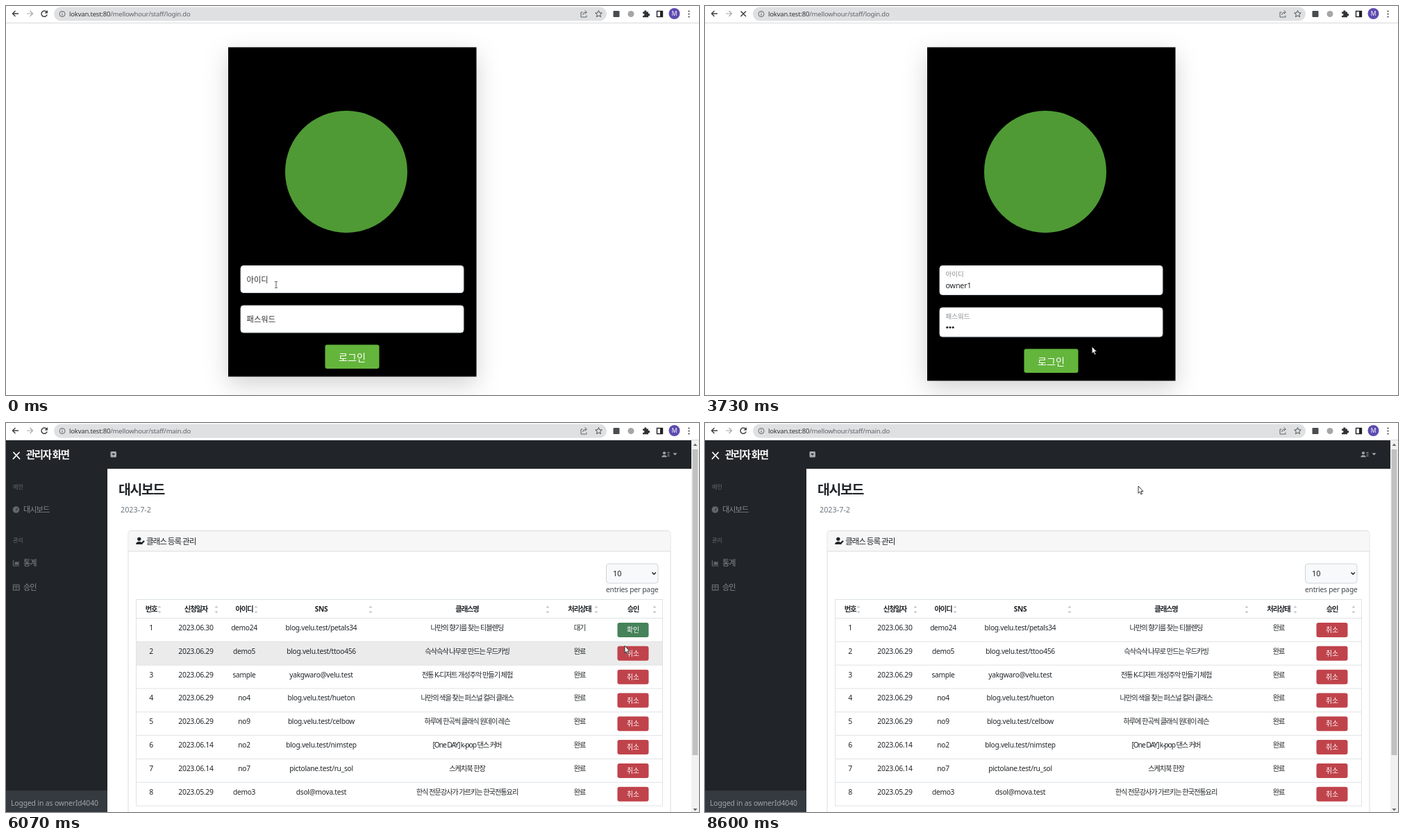
These frames come from a looping animation (998x561 px, 8.67 s). An HTML page:

```html
<!DOCTYPE html>
<html lang="ko">
<head>
<meta charset="utf-8">
<style>
html, body { margin: 0; width: 100%; height: 100%; overflow: hidden; background: #fff; }
svg { display: block; width: 998px; height: 561px; }
text { font-family: "Noto Sans", "Noto Sans CJK KR", sans-serif; white-space: pre; }
</style>
</head>
<body>
<svg id="stage" viewBox="0 0 998 561"></svg>
<script>
const NS = 'http://www.w3.org/2000/svg';
const stage = document.getElementById('stage');

function add(parent, tag, attrs = {}) {
  const el = document.createElementNS(NS, tag);
  for (const k in attrs) el.setAttribute(k, attrs[k]);
  parent.appendChild(el);
  return el;
}
const group = (p, a) => add(p, 'g', a);
const rect = (p, x, y, width, height, fill, more) => add(p, 'rect', { x, y, width, height, fill, ...more });
const circle = (p, cx, cy, r, fill, more) => add(p, 'circle', { cx, cy, r, fill, ...more });
const path = (p, d, fill, more) => add(p, 'path', { d, fill, ...more });
const line = (p, d, stroke, w = 1, more) => path(p, d, 'none', { stroke, 'stroke-width': w, ...more });
function text(p, x, y, str, size, fill, { bold, mid, gap = 0 } = {}) {
  const el = add(p, 'text', {
    x, y, fill, 'font-size': size, 'letter-spacing': gap,
    'font-weight': bold ? 700 : 400, 'text-anchor': mid ? 'middle' : 'start'
  });
  el.textContent = str;
  return el;
}
const show = (el, on) => { el.style.display = on ? '' : 'none'; };
const move = (el, x, y) => el.setAttribute('transform', `translate(${x} ${y})`);
const clamp = v => Math.max(0, Math.min(1, v));
const mix = (a, b, p) => a + (b - a) * p;

/* ---------- login page ---------- */
function buildLogin() {
  const g = group(stage);
  const card = rect(g, 320, 59.5, 357.5, 475, '#000');
  card.style.filter = 'drop-shadow(0 11px 17px rgba(0,0,0,.175))';
  circle(g, 490, 239, 88, '#4f9a35');

  function field(label) {
    const f = group(g);
    const ring = rect(f, 335.5, -2.5, 326, 45, '#0b2256', { rx: 6 });
    const box = rect(f, 338, 0.5, 321, 39, '#fff', { rx: 4 });
    const name = text(f, 0, 0, label, 11.3, '#333');
    const caret = rect(f, 0, 23, 1, 12, '#111');
    return {
      f, caret,
      set(y, p, focus) {
        move(f, 0, y);
        box.setAttribute('height', 39 + 3 * p);
        box.setAttribute('stroke', focus ? '#86a9e8' : '#ced4da');
        ring.setAttribute('height', 45 + 3 * p);
        show(ring, focus);
        show(caret, focus && p === 1);
        name.setAttribute('transform', `translate(346.5 ${mix(24.5, 16, p)}) scale(${mix(1, .84, p)})`);
        name.setAttribute('fill', p > .5 ? '#8a8d90' : '#333');
      }
    };
  }
  const id = field('아이디');
  const pw = field('패스워드');
  const value = text(id.f, 346.5, 32.5, '', 10.8, '#212529', { gap: -.2 });
  const dots = [0, 1, 2].map(i => circle(pw.f, 348.8 + i * 4.2, 29, 1.6, '#212529'));
  const button = group(g);
  const face = rect(button, 459.5, 488.5, 78, 34.5, '#64b53c', { rx: 3 });
  text(button, 498.5, 511.5, '로그인', 14.1, '#fff', { mid: 1 });

  const keys = [730, 930, 1070, 1200, 1330, 1530];
  const dotKeys = [2000, 2130, 2270];
  return t => {
    show(g, t < 5200);
    const a = clamp((t - 138) / 198), b = clamp((t - 1805) / 198);
    id.set(374, a, t >= 200 && t < 1870);
    pw.set(431.5 + 3 * a, b, t >= 1870 && t < 3330);
    value.textContent = 'owner1'.slice(0, keys.filter(k => t >= k).length);
    id.caret.setAttribute('x', 346.5 + (t < 730 ? 0 : value.getComputedTextLength()));
    const n = dotKeys.filter(k => t >= k).length;
    dots.forEach((d, i) => show(d, i < n));
    pw.caret.setAttribute('x', 347 + n * 4.2);
    const shift = 3 * (a + b);
    move(button, 0, shift);
    card.setAttribute('height', 475 + shift);
    face.setAttribute('fill', t >= 3260 && t < 3730 ? '#589f35' : '#64b53c');
  };
}

/* ---------- dashboard ---------- */
const rows = [
  ['2023.06.30', 'demo24', 'blog.velu.test/petals34', '나만의 향기를 찾는 티블렌딩'],
  ['2023.06.29', 'demo5', 'blog.velu.test/ttoo456', '슥삭슥삭 나무로 만드는 우드카빙'],
  ['2023.06.29', 'sample', 'yakgwaro@velu.test', '전통 K-디저트 개성주악 만들기 체험'],
  ['2023.06.29', 'no4', 'blog.velu.test/hueton', '나만의 색을 찾는 퍼스널 컬러 클래스'],
  ['2023.06.29', 'no9', 'blog.velu.test/celbow', '하루에 한곡씩 클래식 원데이 레슨'],
  ['2023.06.14', 'no2', 'blog.velu.test/nimstep', '[One DAY] k-pop 댄스 커버'],
  ['2023.06.14', 'no7', 'pictolane.test/ru_sol', '스케치북 한장'],
  ['2023.05.29', 'demo3', 'dsol@mova.test', '한식 전문강사가 가르키는 한국전통요리']
];
const heads = ['번호', '신청일자', '아이디', 'SNS', '클래스명', '처리상태', '승인'];
const PITCH = 33.82;

function userIcon(p, x, y, s, fill) {
  const g = group(p, { transform: `translate(${x} ${y}) scale(${s})`, fill });
  circle(g, 4, 3, 2.8, fill);
  path(g, 'M-1 11C-1 5.500 9 5.500 9 11Z', fill);
  return g;
}

// The late version has the web font, date, sorting and a scrollbar.
function buildDash(late) {
  const g = group(stage);
  const L = (a, b) => late ? b : a;
  const right = L(998, 987);
  const ink = '#212529', soft = '#86898d';
  rect(g, 0, 25, 998, 536, '#fff');
  rect(g, 0, 25, right, 41, ink);
  rect(g, 0, 66, 146, 495, ink);
  rect(g, 0, 530, 146, 31, '#343a40');

  line(g, 'M11 42.500L19.500 51.500M19 42.500L10.500 51.500', '#fff', 1.8, { 'stroke-linecap': 'round' });
  text(g, L(34, 29), L(51, 50.5), '관리자 화면', 14.4, '#fff', { bold: 1, gap: L(0, -1.4) });
  rect(g, L(151, 150.5), 41, 8.5, 8.5, '#a9abad', { rx: 1.5 });
  path(g, `M${L(153, 152.5)} 44h4.500l-2.250 2.800z`, ink);
  const ux = L(955, 945);
  userIcon(g, ux, 41, .75, '#a0a2a4');
  line(g, `M${ux + 7.5} 42.500h3M${ux + 7.5} 45h3M${ux + 7.5} 47.500h3`, '#a0a2a4');
  path(g, `M${ux + 15.5} 43.500h6l-3 3z`, '#b4b6b8');

  const nav = (y, s) => text(g, 25, y, s, 11.2, soft, { gap: L(0, -1) });
  text(g, 10, 95, '메인', 8.2, '#65696d');
  nav(129, '대시보드');
  text(g, 10, 172, '관리', 8.2, '#65696d');
  nav(206, '통계');
  nav(241, '승인');
  circle(g, 14.500, 125, 4.8, '#63676b');
  line(g, 'M14.500 126.500l2-3.500', ink);
  line(g, 'M10.500 198v8h9', '#63676b', 1.2);
  path(g, 'M12.500 204.500v-3l2-2 2 1.500 2-2v5.500z', '#63676b');
  rect(g, 10.5, 233.500, 8.5, 7.5, 'none', { stroke: '#63676b', 'stroke-width': 1.3 });
  line(g, 'M10.500 236.500h8.500M14.750 234v7', '#63676b');
  text(g, 7, 551.5, 'Logged in as ownerId4040', 10.3, '#a2a5a8', { gap: L(0, -.1) });

  text(g, 162, 103, '대시보드', 19.4, ink, { bold: 1, gap: L(0, -1.3) });
  if (late) text(g, 165, 129, '2023-7-2', 10.8, '#6c757d');

  const top = L(138, 155) + .5, edge = L(968, 957);
  rect(g, 176, top, edge - 176, L(365, 430), '#fff', { rx: 4, stroke: '#dcdcdc' });
  path(g, `M176.500 ${top + 29.5}v-26q0-3 3-3H${edge - 3.5}q3 0 3 3v26z`, '#f7f7f7');
  line(g, `M176 ${top + 29.5}H${edge}`, '#dcdcdc');
  userIcon(g, 188, top + 9, .95, ink);
  line(g, `M194.500 ${top + 19}l4.500-4.500`, ink, 2.4);
  text(g, L(203, 202), top + L(18.5, 19), '클래스 등록 관리', 11.6, ink, { gap: L(0, -1.05) });

  if (late) {
    rect(g, 864.5, 203, 74.5, 28, '#f8f9fa', { rx: 4, stroke: '#ced4da' });
    text(g, 874, 221, '10', 11, ink);
    line(g, 'M930.500 215.500l2.700 2.700 2.700-2.700', ink, 1.6);
    text(g, 864, 243.500, 'entries per page', 10.2, '#43484c', { gap: -.2 });
  }

  const cols = L([208, 270.5, 340, 454, 675, 846, 919], [209, 273.5, 343, 454, 664, 826, 903]);
  const y0 = L(208.5, 281.5), end = L(957, 946), size = L(11.3, 10.3);
  const cell = (c, y, s, more) => {
    const kr = /[가-힣]/.test(s);
    const num = /^[\d.]+$/.test(s);
    return text(g, cols[c], y, s, kr ? size : num ? 10.4 : L(10.8, 10.2), ink,
      { mid: 1, gap: kr ? L(0, -1.12) : L(num ? -.3 : -.1, -.27), ...more });
  };
  const hover = rect(g, 187, y0, end - 187, PITCH, '#ebebeb');
  heads.forEach((h, i) => cell(i, L(198, 272), h, { bold: 1 }));
  if (late) {
    line(g, 'M187 254.500H946M187.500 254V552M945.500 254V552', '#dee2e6');
    for (const x of [221, 303, 360, 525, 780, 850, 934])
      path(g, `M${x - 2.5} 266.500h5l-2.500-3zM${x - 2.5} 271.500h5l-2.500 3z`, '#c3c6c9');
  }
  for (let i = 0; i <= 8; i++) line(g, `M187 ${y0 + i * PITCH}H${end}`, '#dee2e6');

  let state, face, label;
  rows.forEach((r, i) => {
    const y = y0 + i * PITCH;
    const base = y + L(19.5, 17.5);
    [String(i + 1), ...r].forEach((s, c) => cell(c, base, s));
    const st = cell(5, base, i ? '완료' : '대기');
    const btn = rect(g, cols[6] - 22.5, y + 6.5, 45, 21, i ? '#c0434b' : '#46825a', { rx: 3 });
    const tx = text(g, cols[6], y + 20.7, i ? '취소' : '확인', 9.8, '#fff', { mid: 1 });
    if (!i) [state, face, label] = [st, btn, tx];
  });

  if (late) {
    rect(g, 987, 25, 11, 536, '#f1f1f1');
    rect(g, 988.5, 38, 8, 441, '#c1c1c1');
    path(g, 'M989.500 33h6l-3-3.500zM989.500 556h6l-3 3.500z', '#6b6b6b');
  }

  return t => {
    show(g, late ? t >= 5400 : t >= 5200 && t < 5400);
    let row = -1;
    if (late && t < 8470) row = t > 6200 ? 0 : Math.floor((cursorAt(t + 67)[1] - y0) / PITCH);
    show(hover, row >= 0 && row < 8);
    hover.setAttribute('y', y0 + Math.max(row, 0) * PITCH);
    const done = t >= 8530;
    state.textContent = done ? '완료' : '대기';
    label.textContent = done ? '취소' : '확인';
    const press = t >= 6870 && t < 7000;
    face.setAttribute('fill', done ? '#c0434b' : press ? '#315b3d' : t >= 6470 ? '#3d6d4a' : '#46825a');
  };
}

/* ---------- browser bar ---------- */
function buildBar() {
  const g = group(stage), dark = '#3c4043';
  rect(g, 0, 0, 998, 25, '#fff');
  line(g, 'M0 24.500H998', '#d8d8d8');
  line(g, 'M18 11H9.500M13.500 7L9.500 11l4 4', dark, 1.4);
  line(g, 'M30 11h8.500M34.500 7l4 4-4 4', '#a5a7a9', 1.2);
  const reload = group(g);
  line(reload, 'M58.500 8.500A4.200 4.200 0 1 0 59.200 12.500', dark, 1.5);
  path(reload, 'M60 6v4.500h-4.500z', dark);
  const stop = line(g, 'M51.500 7.500l7.500 7.500M59 7.500l-7.500 7.500', dark, 1.5);

  rect(g, 69, 1.500, 796, 20, '#dfe0e1', { rx: 10 });
  circle(g, 81, 11.500, 4, 'none', { stroke: '#5f6368' });
  line(g, 'M81 11v2.700M81 9v1', '#5f6368');
  const url = text(g, 91, 15, '', 9.5, '#5f6368', { gap: -.2 });
  const host = add(url, 'tspan', { fill: '#303336' });
  host.textContent = 'lokvan.test:80';
  const rest = add(url, 'tspan');

  line(g, 'M830.500 9h-2.500v7h8v-2.500M830.500 13q.5-4 5-4M833.500 6.500l3 2.500-3 2.500', '#5f6368');
  path(g, 'M853.500 6.500l1.400 3.200 3.400.3-2.600 2.300.8 3.400-3-1.800-3 1.800.8-3.400-2.600-2.300 3.400-.3z', 'none', { stroke: '#4b4f53' });
  rect(g, 874.500, 7, 9, 9, '#4a4d50', { rx: 1 });
  circle(g, 900, 11.500, 4.5, '#a4a6a8');
  path(g, 'M917 8.500h2.200a1.700 1.700 0 1 1 3.200 0h2.600v2.600a1.700 1.700 0 1 1 0 3.200v2h-8v-2.500a1.600 1.600 0 1 0 0-2.800z', '#303336');
  rect(g, 937.500, 7.500, 8, 8, 'none', { stroke: '#202124', 'stroke-width': 1.4 });
  rect(g, 942, 7.500, 3.5, 8, '#202124');
  circle(g, 962.500, 11, 8, '#5e4bb0');
  text(g, 962.500, 14, 'M', 8.5, '#fff', { mid: 1 });
  for (const y of [7.5, 11.5, 15.5]) circle(g, 983.5, y, 1.1, dark);

  return t => {
    const busy = t >= 3400 && t < 5400;
    show(stop, busy);
    show(reload, !busy);
    rest.textContent = '/mellowhour/staff/' + (t < 4870 ? 'login.do' : 'main.do');
  };
}

/* ---------- alert ---------- */
function buildAlert() {
  const g = group(stage);
  g.style.filter = 'drop-shadow(0 2px 4px rgba(0,0,0,.4))';
  const box = rect(g, 352, 13, 293, 94, '#fff', { rx: 3 });
  const words = group(g);
  text(words, 364, 37, 'lokvan.test:80 내용:', 10, '#202124');
  text(words, 364, 57, '클래스 승인완료', 9.2, '#3c4043');
  rect(g, 591.5, 72, 43, 24.5, '#a9c3ea', { rx: 4 });
  const face = rect(g, 593, 73.5, 40, 21.5, '#1a73e8', { rx: 3 });
  const ok = text(g, 613, 87.5, '확인', 9, '#fff', { mid: 1 });
  return t => {
    show(g, t >= 7470 && t < 8470);
    const p = clamp((t - 7470) / 130);
    const early = p < .3;
    const v = Math.round(mix(164, 255, p));
    box.setAttribute('fill', `rgb(${v},${v},${v})`);
    box.setAttribute('opacity', mix(.86, 1, p));
    words.setAttribute('opacity', mix(.5, 1, p));
    face.setAttribute('fill', early ? '#d2dbe8' : '#1a73e8');
    ok.setAttribute('fill', early ? '#9ba3ad' : '#fff');
    g.setAttribute('opacity', t >= 8400 ? .5 : 1);
  };
}

/* ---------- pointer ---------- */
const track = [
  [0, 389, 402], [2738, 389, 402], [3270, 500, 508], [3670, 500, 508], [3738, 557, 491],
  [4005, 741, 501], [4205, 741, 501], [4338, 746, 498], [5338, 746, 498], [5605, 817, 463],
  [6005, 890, 327], [6205, 893, 310], [6338, 893, 310], [6538, 912, 301], [7538, 912, 301],
  [8205, 620, 86], [8338, 620, 86], [8470, 624, 91], [9000, 624, 91]
];
function cursorAt(t) {
  const i = track.findIndex(k => k[0] > t);
  const a = track[i - 1], b = track[i];
  const p = (t - a[0]) / (b[0] - a[0]);
  return [mix(a[1], b[1], p), mix(a[2], b[2], p)];
}
function buildPointer() {
  const g = group(stage);
  const beam = line(g, 'M-2 -4.500h1.500l.5.500.5-.5h1.500M0 -4V4M-2 4.500h1.500l.5-.5.5.5h1.500', '#444', .9);
  const arrow = path(g, 'M0 0V10.300L2.300 8.200 3.900 11.900 5.600 11.200 4 7.500H7Z', '#fff', { stroke: '#222', 'stroke-width': .9 });
  const hand = path(g, 'M-1 1Q0-.5 1 1V5L5.500 6Q7 6.500 6.500 8.500L5.500 12.500H-.5L-3.500 8.500Q-3.500 6.500-1 8Z', '#fff', { stroke: '#222', 'stroke-width': .9 });
  return t => {
    const [x, y] = cursorAt(t);
    let kind = arrow;
    if (t < 3730) {
      if (y < 417 || (y > 434 && y < 477)) kind = beam;
      else if (y > 494) kind = hand;
    } else if (t > 6400 && t < 7600 && x > 880 && y < 309) kind = hand;
    for (const k of [beam, arrow, hand]) show(k, k === kind);
    move(g, x, y);
  };
}

const parts = [buildLogin(), buildDash(false), buildDash(true), buildBar(), buildAlert(), buildPointer()];
const LOOP = 8670, start = performance.now();

function tick() {
  const ms = (performance.now() - start) % LOOP;
  const t = Math.floor((ms + 4) * .015) / .015 + 5;
  for (const draw of parts) draw(t);
  requestAnimationFrame(tick);
}
tick();
</script>
</body>
</html>
```
